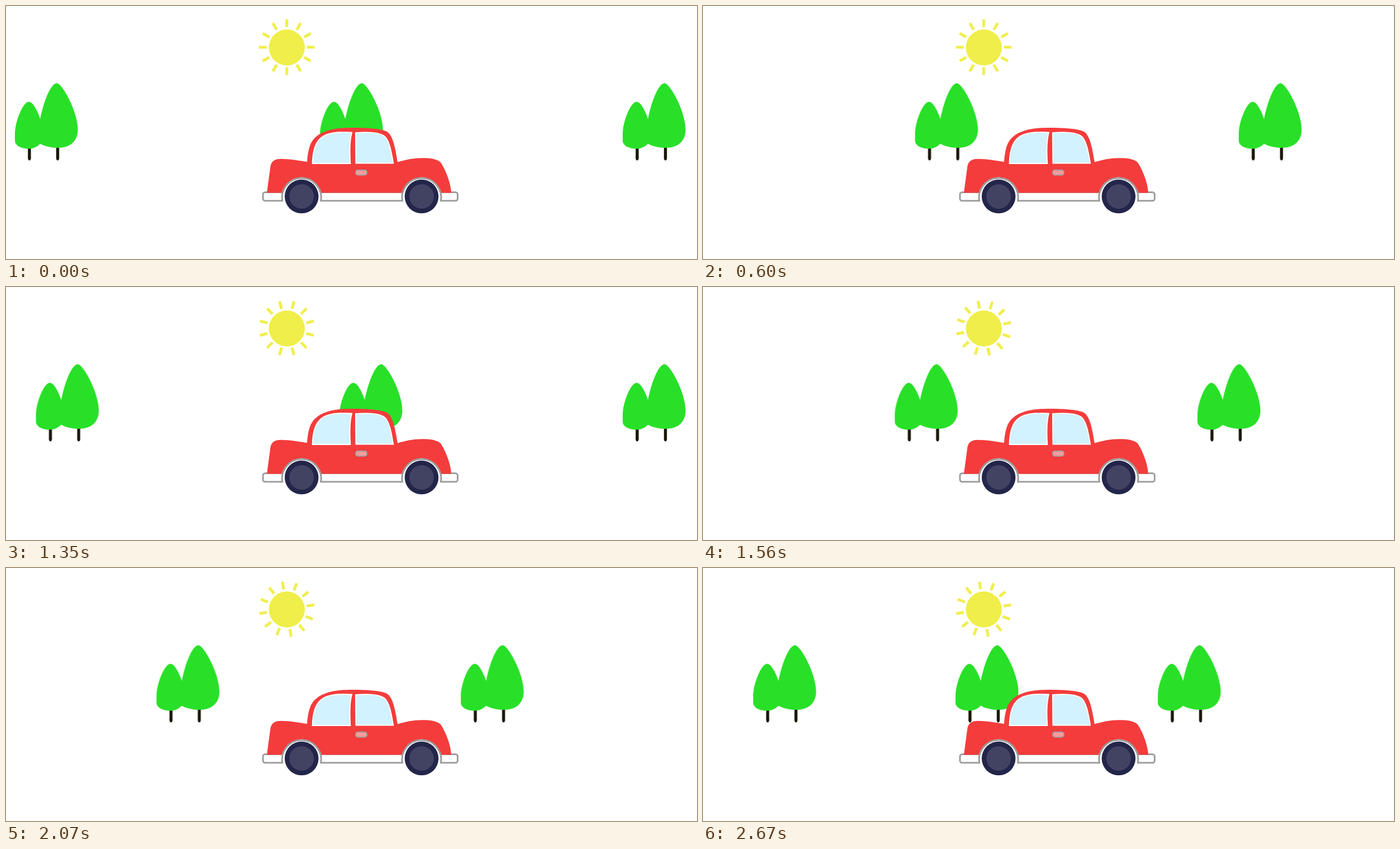
Recreate the animation shown at these times as an HTML page without scripts. Size 1237x453 px, loop 2.7 s.

```html
<!DOCTYPE html>
<html lang="en">
<head>
<meta charset="utf-8">
<title>Car drive</title>
<style>
  html, body { margin: 0; width: 100%; height: 100%; overflow: hidden; background: #fff; }
  svg { display: block; width: 1237px; height: 453px; }

  /* Everything ticks at 30 ms, 90 ticks per loop; delays lead by 3 ms. */
  .road, .rays { animation: drive 2.7s steps(90) -3ms infinite; }
  .rays { animation-name: spin; }

  /* --s is the tick at which a tree sets off */
  .road use {
    translate: calc(var(--s) * 36.22px);
    animation: show 2.7s step-end calc(var(--s) * 30ms - 2703ms) infinite;
  }
  .wait { animation: wait 2.7s step-end -3ms infinite; }

  @keyframes drive { to { transform: translateX(-3259.8px); } }
  @keyframes spin { to { transform: rotate(810deg); } }
  @keyframes show { 0% { opacity: 1; } 40%, 100% { opacity: 0; } }
  @keyframes wait {
    0%, 17.7778%, 34.4444%, 51.1111%, 67.7778%, 78.8889%, 90%, 100% { opacity: 0; }
    16.6667%, 33.3333%, 50%, 66.6667%, 77.7778%, 88.8889% { opacity: 1; }
  }
</style>
</head>
<body>
<svg viewBox="0 0 1237 453">
  <defs>
    <g id="tree">
      <path d="M1129.9 254V273.5M1180.5 252V273.5" stroke="#1a170a" stroke-width="5.4"/>
      <path d="M1129.9 270V274.2M1180.5 270V274.2" stroke="#1a170a" stroke-width="4.6" stroke-linecap="round"/>
      <g fill="#28e028">
        <path d="M1129 171.5C1136 171.5 1145 188 1150 205V246C1144 251.5 1138 255.5 1129 255.5C1115 255.5 1104 250 1104 241V228C1104 208 1118 171.5 1129 171.5Z"/>
        <path d="M1149 203C1155 172 1168 138.3 1179 138.3C1188 138.3 1216 187 1216.6 222C1216 243 1202 254 1180 254C1167 254 1155 250 1149 246.5Z"/>
      </g>
    </g>
    <path id="ray" d="M0-36V-49.8"/>
    <g id="rays3">
      <use href="#ray"/>
      <use href="#ray" transform="rotate(30)"/>
      <use href="#ray" transform="rotate(60)"/>
    </g>
    <g id="wheel">
      <circle r="34.5" fill="#fff"/>
      <path d="M-34.3 9A35 35 0 1 1 34.3 9" fill="none" stroke="#9e9e9e" stroke-width="3"/>
      <circle r="30.3" fill="#23264a"/>
      <circle r="22" fill="#424362"/>
    </g>
  </defs>

  <circle cx="502.7" cy="74.2" r="32.2" fill="#f0ee4a"/>
  <g transform="translate(502.6 73.8)">
    <g class="rays" stroke="#f0ee4a" stroke-width="5">
      <use href="#rays3"/>
      <use href="#rays3" transform="rotate(90)"/>
      <use href="#rays3" transform="rotate(180)"/>
      <use href="#rays3" transform="rotate(270)"/>
    </g>
  </g>

  <g class="road">
    <use href="#tree" style="--s:-30.04"/>
    <use href="#tree" style="--s:-14.96"/>
    <use href="#tree" style="--s:0"/>
    <use href="#tree" style="--s:16"/>
    <use href="#tree" style="--s:31"/>
    <use href="#tree" style="--s:45.96"/>
    <use href="#tree" style="--s:61"/>
    <use href="#tree" style="--s:71"/>
    <use href="#tree" style="--s:81"/>
  </g>
  <use class="wait" href="#tree"/>

  <g>
    <rect x="460" y="333.4" width="348.5" height="15.4" rx="4" fill="#fff" stroke="#9e9e9e" stroke-width="3"/>
    <path fill="#f43c3c" d="M467 334.6L473 290C474 278 481 273.8 492 273.8C507 273.8 525 277 539 279C541 255 545 243 554 235C570 220.5 595 218 620 218C650 218 672 220 682 225C693 232 697 255 701 279.5C714 275.5 730 272.3 744 272.3C760 272.3 772 274 778 280C787 293 797 319 797 334.6Z"/>
    <g fill="#d2f2ff" stroke="#fff" stroke-width="2">
      <path d="M548.7 282C549 262 553 245 564 236C575 227 592 225 619 226.5C614.5 242 615 262 616.3 282Z"/>
      <path d="M626.5 281.5L626 227C650 225 668 227 676 232C686 238 690 262 693.2 281.5Z"/>
    </g>
    <rect x="626" y="293.7" width="20" height="9" rx="4" fill="#ff9c9c" stroke="#9e9e9e" stroke-width="2"/>
    <use href="#wheel" x="529.2" y="341"/>
    <use href="#wheel" x="744" y="341"/>
  </g>
</svg>
</body>
</html>
```
